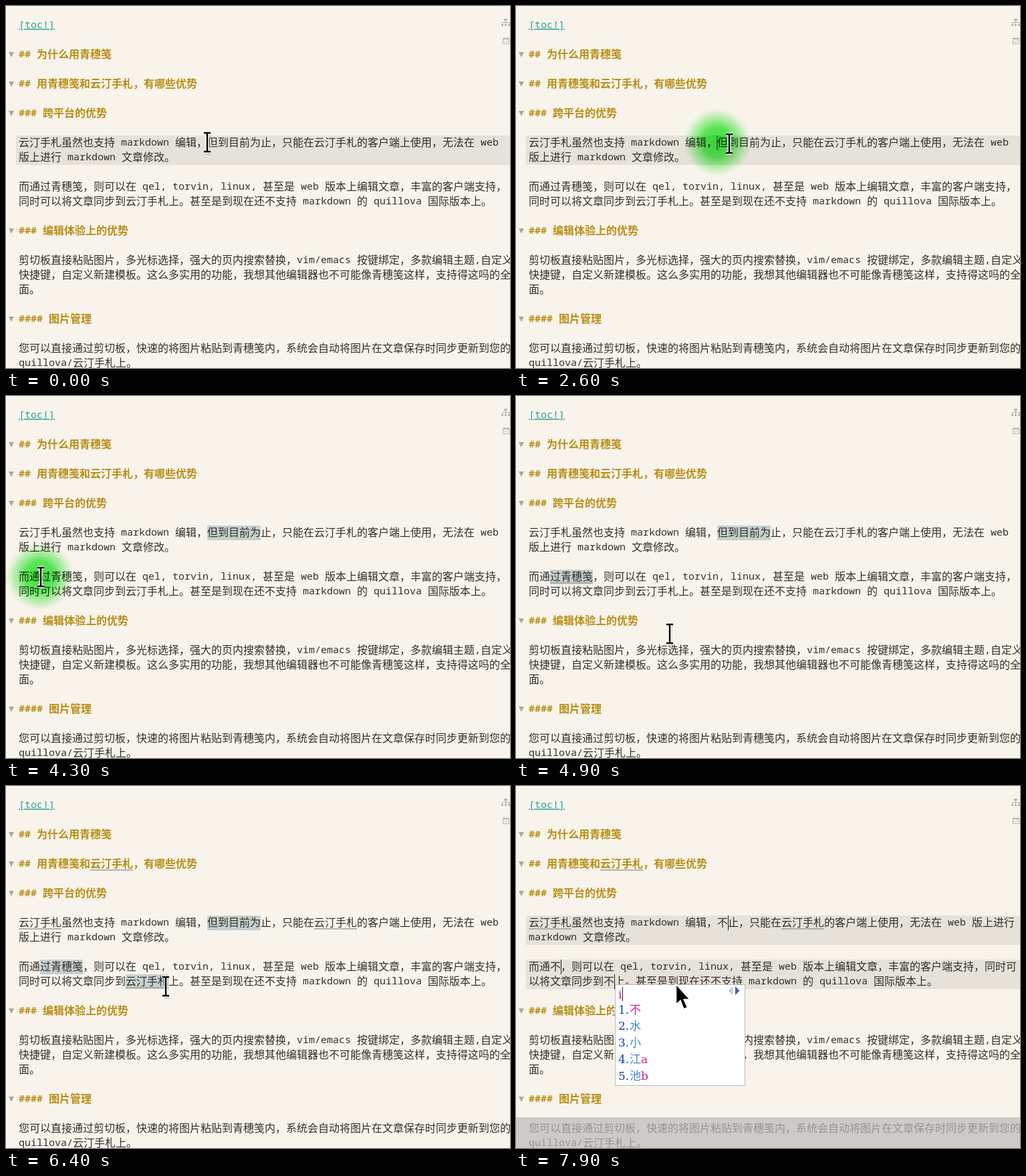
Animation of 754 by 542 pixels, one loop 8 s. Source, as an HTML page:

```html
<!DOCTYPE html>
<html lang="zh-CN">
<head>
<meta charset="utf-8">
<title>多光标编辑</title>
<style>
html, body { margin: 0; width: 100%; height: 100%; overflow: hidden; background: #f8f4ec; }
svg { display: block; width: 754px; height: 542px; }
text { white-space: pre; fill: #302f2a; }
.cjk { font: 16px "Noto Sans CJK SC", "Noto Sans CJK", sans-serif; }
.lat { font: 15px "Noto Sans Mono", monospace; }
.head text { font-weight: 700; fill: #b98c14; }
.head path { fill: #aaa7a1; }
.link text { fill: #2aa198; text-decoration: underline; }
.ime text { font: 17px "DejaVu Serif", "Noto Sans CJK SC", serif; }
</style>
</head>
<body>
<svg id="stage" viewBox="0 0 754 542">
  <defs>
    <radialGradient id="green">
      <stop offset="0" stop-color="#38ee38"/>
      <stop offset=".45" stop-color="#50ef50" stop-opacity=".92"/>
      <stop offset=".75" stop-color="#7cf27c" stop-opacity=".5"/>
      <stop offset="1" stop-color="#a8f5a8" stop-opacity="0"/>
    </radialGradient>
  </defs>
  <g id="marks"></g>
  <g id="page"></g>
  <g id="before"></g>
  <g id="after"></g>
  <g fill="none" stroke="#b5b2ac">
    <path d="M747.5 22v3M742.5 27v-2.5h11v2.5M747.5 24v3"/>
    <path d="M745.5 19.5h4v2h-4zM741.5 27.5h2v2h-2zM746.5 27.5h2v2h-2zM751.5 27.5h2v2h-2z" fill="#b5b2ac"/>
    <path d="M743.5 48.5h9v8h-9zM743 49.5h10M745.5 46.5v2M750.5 46.5v2M745.5 52.5l2 2 3-3"/>
  </g>
  <circle id="glow" r="51" fill="url(#green)" style="mix-blend-mode:multiply"/>
  <g id="carets"></g>
  <rect id="band" y="496" width="754" height="46" fill="#bebcb9"/>
  <g id="ime" class="ime"></g>
  <g id="beam" fill="none">
    <path d="M-4 -13.5h3l1 1 1-1h3M0-12.5V14M-4 15h3l1-1 1 1h3" stroke="#aaa" stroke-opacity=".5" stroke-width="4" transform="translate(1.5 1.5)"/>
    <path d="M-5 -14h4l1 1 1-1h4M0-13V13M-5 14h4l1-1 1 1h4" stroke="#fff" stroke-width="5"/>
    <path d="M-5 -14h4l1 1 1-1h4M0-13V13M-5 14h4l1-1 1 1h4" stroke="#000" stroke-width="2.4"/>
  </g>
  <path id="arrow" d="M239.5 297v30l6.5-6 5 13 5.5-2.5-5.5-12h9z" fill="#000" stroke="#fff" stroke-width="1.5"/>
</svg>
<script>
const LOOP = 8000, STEP = 100, TYPED = 7800;
const $ = id => document.getElementById(id);

function add(parent, tag, attrs, content = '') {
  const el = document.createElementNS('http://www.w3.org/2000/svg', tag);
  for (const k in attrs) el.setAttribute(k, attrs[k]);
  el.textContent = content;
  return parent.appendChild(el);
}
const rect = (parent, x, y, width, height, fill) =>
  add(parent, 'rect', { x, y, width, height, fill });

// Wide characters advance 16px, Latin ones 9px.
function line(parent, top, str) {
  let x = 19;
  for (const run of str.match(/[\x20-\x7e]+|[^\x20-\x7e]+/g)) {
    const latin = run.charCodeAt(0) < 127;
    add(parent, 'text', { x, y: top + (latin ? 15 : 16), class: latin ? 'lat' : 'cjk' }, run);
    x += run.length * (latin ? 9 : 16);
  }
}
function heading(top, str) {
  const g = add($('page'), 'g', { class: 'head' });
  add(g, 'path', { d: `M4 ${top + 7}h8l-4 8z` });
  line(g, top, str);
}

line(add($('page'), 'g', { class: 'link' }), 18, '[toc!]');
heading(62, '## 为什么用青穗笺');
heading(106, '## 用青穗笺和云汀手札，有哪些优势');
heading(150, '### 跨平台的优势');
heading(326, '### 编辑体验上的优势');
heading(458, '#### 图片管理');
[
  [370, '剪切板直接粘贴图片，多光标选择，强大的页内搜索替换，vim/emacs 按键绑定，多款编辑主题,自定义'],
  [392, '快捷键，自定义新建模板。这么多实用的功能，我想其他编辑器也不可能像青穗笺这样，支持得这吗的全'],
  [414, '面。'],
  [502, '您可以直接通过剪切板，快速的将图片粘贴到青穗笺内，系统会自动将图片在文章保存时同步更新到您的'],
  [524, 'quillova/云汀手札上。']
].forEach(([top, str]) => line($('page'), top, str));

const paragraphs = (id, lines) =>
  lines.forEach((str, i) => line($(id), [194, 216, 260, 282][i], str));
paragraphs('before', [
  '云汀手札虽然也支持 markdown 编辑，但到目前为止，只能在云汀手札的客户端上使用，无法在 web',
  '版上进行 markdown 文章修改。',
  '而通过青穗笺，则可以在 qel, torvin, linux, 甚至是 web 版本上编辑文章，丰富的客户端支持，',
  '同时可以将文章同步到云汀手札上。甚至是到现在还不支持 markdown 的 quillova 国际版本上。'
]);
paragraphs('after', [
  '云汀手札虽然也支持 markdown 编辑，不止，只能在云汀手札的客户端上使用，无法在 web 版上进行',
  'markdown 文章修改。',
  '而通不，则可以在 qel, torvin, linux, 甚至是 web 版本上编辑文章，丰富的客户端支持，同时可',
  '以将文章同步到不上。甚至是到现在还不支持 markdown 的 quillova 国际版本上。'
]);

// Input method popup
const ime = $('ime'), pink = '#d81b8c', navy = '#173f9f', sky = '#3f8ad0';
rect(ime, 148.5, 297.5, 194, 151, '#fff').setAttribute('stroke', '#bcbcbc');
const word = (x, y, fill, str) => add(ime, 'text', { x, y, style: `fill:${fill}` }, str);
word(153, 318, pink, 'i');
rect(ime, 159, 301, 1, 21, '#222');
add(ime, 'path', { d: 'M324 300v13l-6-6.5z', fill: '#b9cbe6' });
add(ime, 'path', { d: 'M328 300v13l6.5-6.5z', fill: '#3d62b5' });
['不', '水', '小', '江a', '池b'].forEach((s, i) => {
  const y = 340.5 + i * 24.8;
  word(153, y, navy, i + 1 + '.');
  word(170, y, i ? sky : pink, s[0]);
  if (s[1]) word(187, y, pink, s[1]);
});

// time, x, y of the pointer
const path = [
  [0, 301, 204], [1600, 301, 204], [2000, 390, 205], [2300, 301, 204], [2500, 303, 205],
  [2600, 319, 206], [2900, 383, 206], [3200, 360, 216], [3600, 140, 264], [3800, 87, 271],
  [4200, 52, 271], [4300, 52, 271], [4600, 115, 272], [4900, 230, 356], [5200, 232, 354],
  [5600, 180, 294], [5700, 180, 294], [5900, 243, 295], [6100, 243, 297], [6400, 239, 300], [LOOP, 239, 300]
];
function pointer(t) {
  const i = Math.max(1, path.findIndex(p => p[0] > t));
  const [a, b] = [path[i - 1], path[i]], k = (t - a[0]) / (b[0] - a[0]);
  return [a[1] + (b[1] - a[1]) * k, a[2] + (b[2] - a[2]) * k];
}

const drags = [
  { x: 301, top: 194, w: 80, press: 2300, start: 2500, end: 2900, lineOff: 4300 },
  { x: 51, top: 260, w: 64, press: 4300, start: 4300, end: 4600, lineOff: 5700 },
  { x: 179, top: 282, w: 64, press: 5700, start: 5700, end: 5900, lineOff: TYPED }
];
const marks = $('marks'), carets = $('carets'), LAG = 100;
const underline = (x, top, w) => rect(marks, x, top + 19, w, 1.6, '#a3a49f');
const active = top => rect(marks, 15, top, 739, 44, '#e6e1d9');
const caret = (x, top) => rect(carets, x - .5, top, 1, 22, '#222');
const show = (id, on) => $(id).setAttribute('visibility', on ? 'visible' : 'hidden');

function draw(t) {
  const typed = t >= TYPED, [px, py] = pointer(t);
  marks.textContent = carets.textContent = '';
  show('before', !typed);
  show('after', typed);
  show('ime', typed);
  show('arrow', typed);
  show('beam', !typed);
  $('beam').setAttribute('transform', `translate(${px.toFixed(1)} ${py.toFixed(1)})`);
  $('band').setAttribute('opacity', typed ? (t < TYPED + STEP ? .36 : .72) : 0);

  let glow = 0;
  for (const d of drags) {
    const late = Math.min(t - LAG, d.end);
    if (!typed && late >= d.start) {
      const w = Math.round((pointer(late)[0] - d.x) / 16) * 16;
      rect(marks, d.x, d.top, Math.max(0, Math.min(d.w, w)), 22, '#c6d0ce');
      if (late >= d.end && t < d.lineOff) underline(d.x, d.top, d.w);
    }
    if (t >= d.press && t < d.end + 300) {
      glow = Math.min(1, (d.end + 300 - t) / 300);
      $('glow').setAttribute('cx', d.x);
      $('glow').setAttribute('cy', d.top + 10);
    }
  }
  $('glow').setAttribute('opacity', glow);

  if (t < 2700) {
    active(194);
    caret(301, 194);
  }
  if (typed) {
    active(194);
    active(260);
    caret(317.5, 194);
    caret(67.5, 260);
    caret(147.5, 282);
  }
  if (t >= 6000) {
    underline(126, 106, 64);
    underline(19, 194, 64);
    underline(typed ? 397 : 461, 194, 64);
  }
}

let last = -1;
const origin = performance.now();
function tick(now) {
  const t = Math.floor(Math.max(0, now - origin) % LOOP / STEP) * STEP;
  if (t !== last) draw(last = t);
  requestAnimationFrame(tick);
}
draw(0);
requestAnimationFrame(tick);
</script>
</body>
</html>
```
